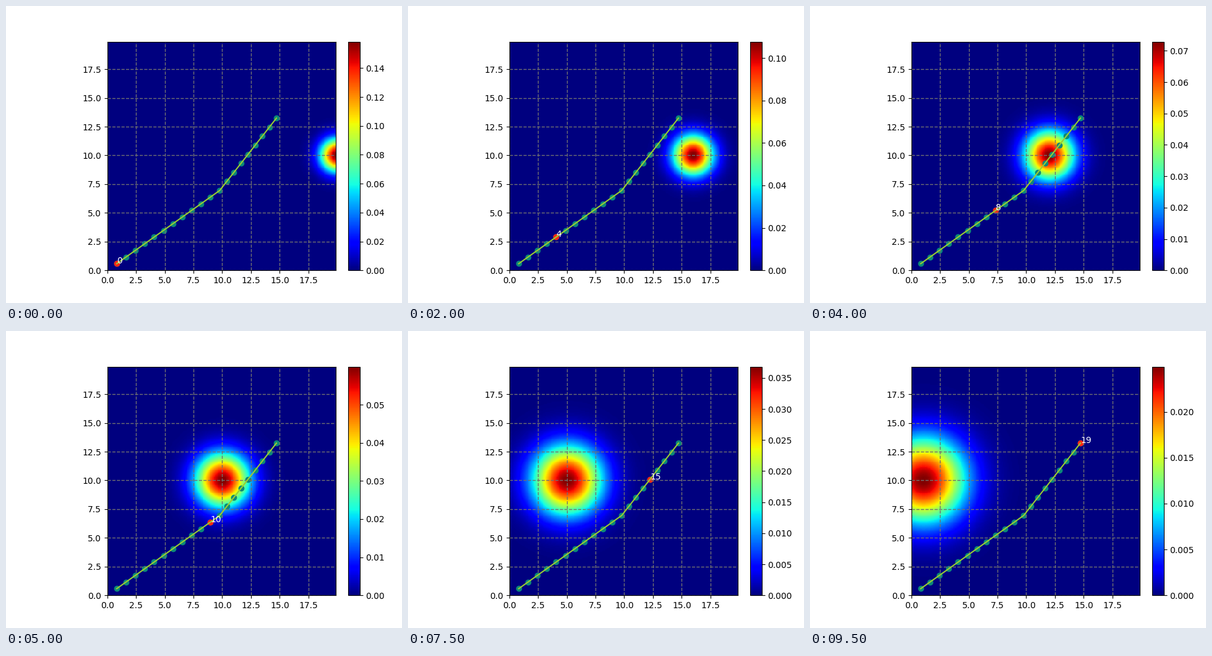
Animation of 640 by 480 pixels, one loop 10000 ms. Source, as a matplotlib script:

```python
import numpy as np
import matplotlib.pyplot as plt
from matplotlib.animation import FuncAnimation

STEPS = 20
GRID = np.arange(200) * 0.1
EXTENT = GRID[-1]
BEND = 12  # unit steps before the path turns
X, Y = np.meshgrid(GRID, GRID)


def density(step):
    """Gaussian drifting left while its spread grows 5% per step."""
    sigma = 1.05 ** step
    dist2 = (X - (20 - step)) ** 2 + (Y - 10) ** 2
    return np.exp(-dist2 / (2 * sigma**2)) / (2 * np.pi * sigma**2)


headings = np.radians(np.where(np.arange(STEPS) < BEND, 35.4, 51.9))
path = np.cumsum(np.column_stack([np.cos(headings), np.sin(headings)]), axis=0)

plt.rcParams["font.family"] = "DejaVu Sans"
fig, ax = plt.subplots(figsize=(6.4, 4.8), dpi=100)

image = ax.imshow(density(0), cmap="jet", origin="lower",
                  extent=(0, EXTENT, 0, EXTENT), interpolation="nearest")
fig.colorbar(image, ax=ax, fraction=0.046, pad=0.04)

ax.scatter(*path.T, color="#0c8878")
current = ax.scatter(*path[0], color="#fa2814")
ax.plot(*path.T, color="yellowgreen", lw=1.5)
label = ax.text(*path[0], "0", color="white")

ticks = np.arange(0, EXTENT, 2.5)
ax.set(xlim=(0, EXTENT), ylim=(0, EXTENT), xticks=ticks, yticks=ticks)
ax.grid(color="#707070", linestyle="--", linewidth=1)


def update(step):
    field = density(step)
    image.set_data(field)
    image.set_clim(0, field.max())
    current.set_offsets(path[step])
    label.set_position(path[step])
    label.set_text(str(step))
    return image, current, label


anim = FuncAnimation(fig, update, frames=STEPS, interval=500,
                     repeat=True, repeat_delay=0, blit=False)
plt.show()
```
